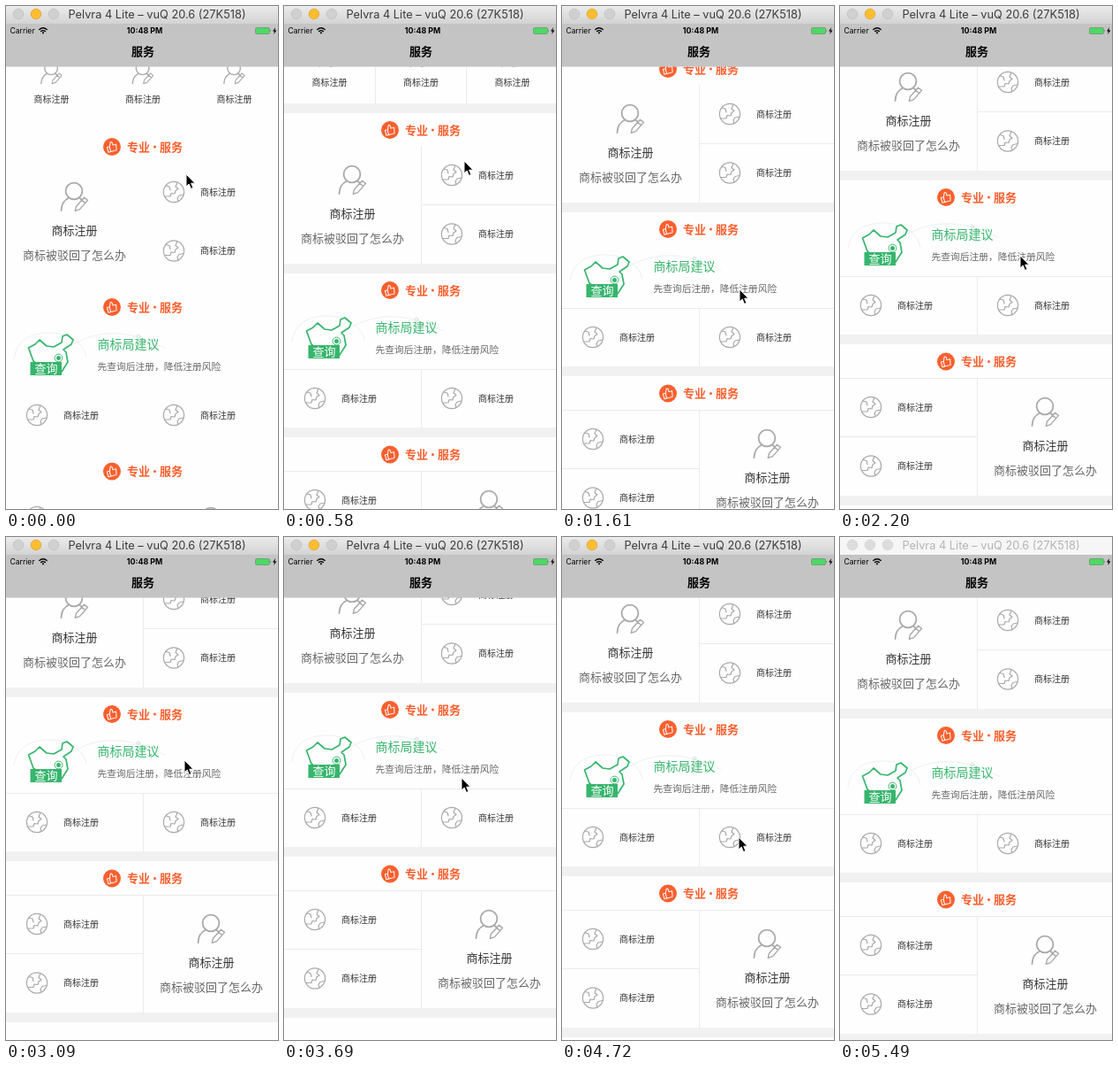
An HTML page that plays this animation: 308x568 px, repeating every 5.59 s.

```html
<!DOCTYPE html>
<html lang="zh">
<head>
<meta charset="utf-8">
<title>服务</title>
<style>
html, body { margin: 0; width: 100%; height: 100%; overflow: hidden; background: #fefefe; }
svg { display: block; width: 308px; height: 568px; }
text { font-family: "Noto Sans CJK SC", "Noto Sans CJK", sans-serif; }
.latin { font-family: Inter, "Liberation Sans", sans-serif; }
.mid { text-anchor: middle; }
.line { fill: none; stroke-linecap: round; stroke-linejoin: round; }
</style>
</head>
<body>
<svg viewBox="0 0 308 568">
  <defs>
    <linearGradient id="bar" x2="0" y2="1">
      <stop stop-color="#ebebeb"/><stop offset="1" stop-color="#d3d3d3"/>
    </linearGradient>
    <g id="globe" class="line" stroke="#a9a9a9" stroke-width="1.2">
      <circle r="11.6"/>
      <path d="M4-10.8L2-6L5-3.5L2-1.5L1 2L-3 1.5L-4 5H-10.4M-9-7L-5-6L-4-2M11 3L6 4L4 7L5 10.4"/>
    </g>
    <g id="person" class="line" stroke="#a9a9a9" stroke-width="1.8">
      <circle cx="-.5" cy="-6" r="9.4"/>
      <path d="M-6.5 1.8Q-14.5 5.5-15 16M5.5 1.8L8 3.6"/>
      <path d="M11 1.2L15 4.4L6 14.6L.8 16.4L2 11.2ZM8.2 4.2L12.2 7.6" stroke-width="1.4"/>
    </g>
    <g id="thumb">
      <circle r="10" fill="#f9602f"/>
      <path class="line" stroke="#fff" transform="rotate(-14)"
        d="M-5.5-1H-2.7V5H-5.5ZM-2.7-.6L-.4-5.6Q2.2-5.6 1.3-1.6H5.2L4 5H-2.7"/>
    </g>
  </defs>

  <rect width="308" height="568" fill="#fefefe"/>
  <g id="page">
    <g id="trim"></g>
    <g class="line" stroke="#e5eeea" stroke-width=".8">
      <path d="M9 58C12 36 30 29 49 29S87 38 91 56M76 42C100 28 135 22 180 46"/>
      <circle cx="150" cy="33" r="1.8" stroke="#cfd8d4"/>
    </g>
    <path class="line" stroke="#37b56d" stroke-width="1.7"
      d="M25.5 46L33 42L38 37L46 44L54 45L63 40L64 33L69 31L76 37L74 42L65 48L68 51L70 62L63 73L48 74L31 61Z"/>
    <circle cx="59.5" cy="57.5" r="4.4" fill="#fefefe" stroke="#37b56d"/>
    <circle cx="59.5" cy="57.5" r="2.5" fill="#37b56d"/>
    <rect x="27.5" y="62" width="35.5" height="15" fill="#37b56d"/>
    <g id="items"></g>
  </g>

  <rect y="20" width="308" height="48.6" fill="#c4c4c4"/>
  <text class="mid" x="155" y="56.4" font-size="13" font-weight="700">服务</text>
  <text class="latin" x="4.5" y="31" font-size="8.6">Carrier</text>
  <g class="line" stroke="#000" stroke-width="1.4">
    <path d="M37.8 26.5Q42 22.8 46.2 26.5M39.6 28.6Q42 26.6 44.4 28.6"/>
    <circle cx="42" cy="30.3" r=".4"/>
  </g>
  <text class="latin mid" x="157" y="31" font-size="8.9" font-weight="700">10:48 PM</text>
  <rect x="282.5" y="24.5" width="16" height="7" rx="1.5" fill="#4cd964" stroke="#6f8f74" stroke-width=".7"/>
  <path d="M299.5 26.5q1.4 1.5 0 3z" fill="#666"/>
  <path d="M305 24L302 28.4H304L303.2 32L306.4 27.4H304.3Z"/>

  <g id="cursor">
    <path d="M0 0V14L3.2 11L5.5 16.5L8 15.4L5.7 10.2H10Z" stroke="#fff"/>
  </g>

  <rect width="308" height="20" fill="url(#bar)"/>
  <rect id="idle" width="308" height="20" fill="#f6f6f6"/>
  <g id="lights"></g>
  <text id="caption" class="latin mid" x="171" y="14" font-size="12.8">Pelvra 4 Lite – vuQ 20.6 (27K518)</text>
</svg>
<script>
const LOOP = 5590, TICK = 147, TICKS = 38, IDLE = 5490;
const ORANGE = '#f9602f', GREEN = '#37b56d', INK = '#333', GREY = '#666';
const HALF = 155;
const $ = id => document.getElementById(id);

function add(parent, tag, attrs, text) {
  const el = document.createElementNS('http://www.w3.org/2000/svg', tag);
  for (const k in attrs) el.setAttribute(k, attrs[k]);
  if (text) el.textContent = text;
  $(parent).append(el);
  return el;
}
const rect = (x, y, width, height, fill = '#ebebeb') => add('trim', 'rect', { x, y, width, height, fill });
const gap = y => rect(0, y, 308, 11, '#f1f1f1');
const icon = (id, x, y, k = 1) =>
  add('items', 'use', { href: '#' + id, transform: `translate(${x} ${y}) scale(${k})` });

// y is the middle of the line of text
function label(text, x, y, size, fill = INK, more = {}) {
  add('items', 'text', { x, y: y + size * 0.38, 'font-size': size, fill, ...more }, text);
}
const centred = { class: 'mid' };

function heading(y) {
  const bold = { 'font-weight': 700 };
  icon('thumb', 120, y);
  label('专业', 137, y, 13, ORANGE, bold);
  label('服务', 174, y, 13, ORANGE, bold);
  add('items', 'circle', { cx: 168.5, cy: y, r: 1.5, fill: ORANGE });
}
function smallCell(x, y) {
  icon('globe', x + 35, y);
  label('商标注册', x + 65, y, 10);
}
function bigCell(x, y) {
  icon('person', x, y);
  label('商标注册', x, y + 38.5, 13, INK, centred);
  label('商标被驳回了怎么办', x, y + 66.5, 13, GREY, centred);
}

// A heading over one big cell and two small ones.
function mixed(y, bigX, smallX) {
  const top = Math.round(y + 18);
  heading(y);
  bigCell(bigX + HALF / 2, top + 38);
  smallCell(smallX, top + 33);
  smallCell(smallX, top + 99.5);
  rect(HALF, top, 1, 133);
  rect(smallX, top + 66, HALF, 1);
  gap(top + 133);
}

// The page is laid out around its middle heading, at y = 0.
for (const i of [0, 1, 2]) {
  const x = 51.5 + i * 103.5;
  icon('person', x, -265, 0.78);
  label('商标注册', x, -234.5, 10, INK, centred);
  if (i) rect(i * 103, -300, 1, 89);
}
gap(-211);
mixed(-181, 0, HALF);

heading(0);
label('查询', 45.5, 69.5, 13, '#fff', centred);
label('商标局建议', 103.5, 42, 14, GREEN);
label('先查询后注册，降低注册风险', 103.5, 67.3, 10.75, GREY);
rect(0, 89, 308, 1);
rect(HALF, 89, 1, 66);
smallCell(0, 122);
smallCell(HALF, 122);
gap(155);

rect(0, 204, 308, 1);
mixed(185.5, HALF, 0);

const lights = [14, 34, 54].map(cx =>
  add('lights', 'circle', { cx, cy: 9, r: 5.8, 'stroke-width': 0.7 }));

// Holds each frame until the next one.
function play(el, frames) {
  const held = frames.map(f => ({ ...f, easing: 'step-end' }));
  held.push({ ...frames[frames.length - 1], offset: 1 });
  el.animate(held, { duration: LOOP, iterations: Infinity });
}
const toggle = (el, at, before, after) =>
  play(el, [{ offset: 0, ...before }, { offset: at / LOOP, ...after }]);

// Straight runs between keys [tick, x, y], sampled once per tick.
function at(keys, k) {
  const i = keys.findIndex(key => key[0] > k);
  if (i < 0) return keys[keys.length - 1].slice(1);
  const [a, b] = [keys[i - 1], keys[i]];
  const p = (k - a[0]) / (b[0] - a[0]);
  return a.slice(1).map((v, j) => v + (b[j + 1] - v) * p);
}
function travel(el, keys) {
  play(el, Array.from({ length: TICKS }, (_, k) => {
    const [x, y] = at(keys, k).map(Math.round);
    const time = Math.floor(k * TICK / 10) * 10;
    return { offset: time / LOOP, transform: `translate(${x}px, ${y}px)` };
  }));
}

travel($('page'), [
  [0, 0, 340], [4, 0, 321], [7, 0, 282], [8, 0, 282], [11, 0, 252], [15, 0, 216],
  [21, 0, 200], [23, 0, 195], [25, 0, 195], [29, 0, 209], [35, 0, 224]
]);
travel($('cursor'), [
  [0, 204, 190], [4, 204, 175], [8, 204, 150], [9, 200, 340], [11, 201, 320], [15, 204, 282],
  [21, 202, 252], [23, 201, 244], [29, 200, 329], [34, 200, 345], [35, 200, 700]
]);

toggle($('trim'), 140, { opacity: 0 }, { opacity: 1 });
toggle($('idle'), IDLE, { opacity: 0 }, { opacity: 1 });
toggle($('caption'), IDLE, { fill: '#3c3c3c' }, { fill: '#b4b4b4' });
lights.forEach((el, i) => toggle(el, IDLE,
  i === 1 ? { fill: '#fdbd30', stroke: '#dfa023' } : { fill: '#d0d0d0', stroke: '#bcbcbc' },
  { fill: '#dcdcdc', stroke: '#d2d2d2' }));
</script>
</body>
</html>
```
